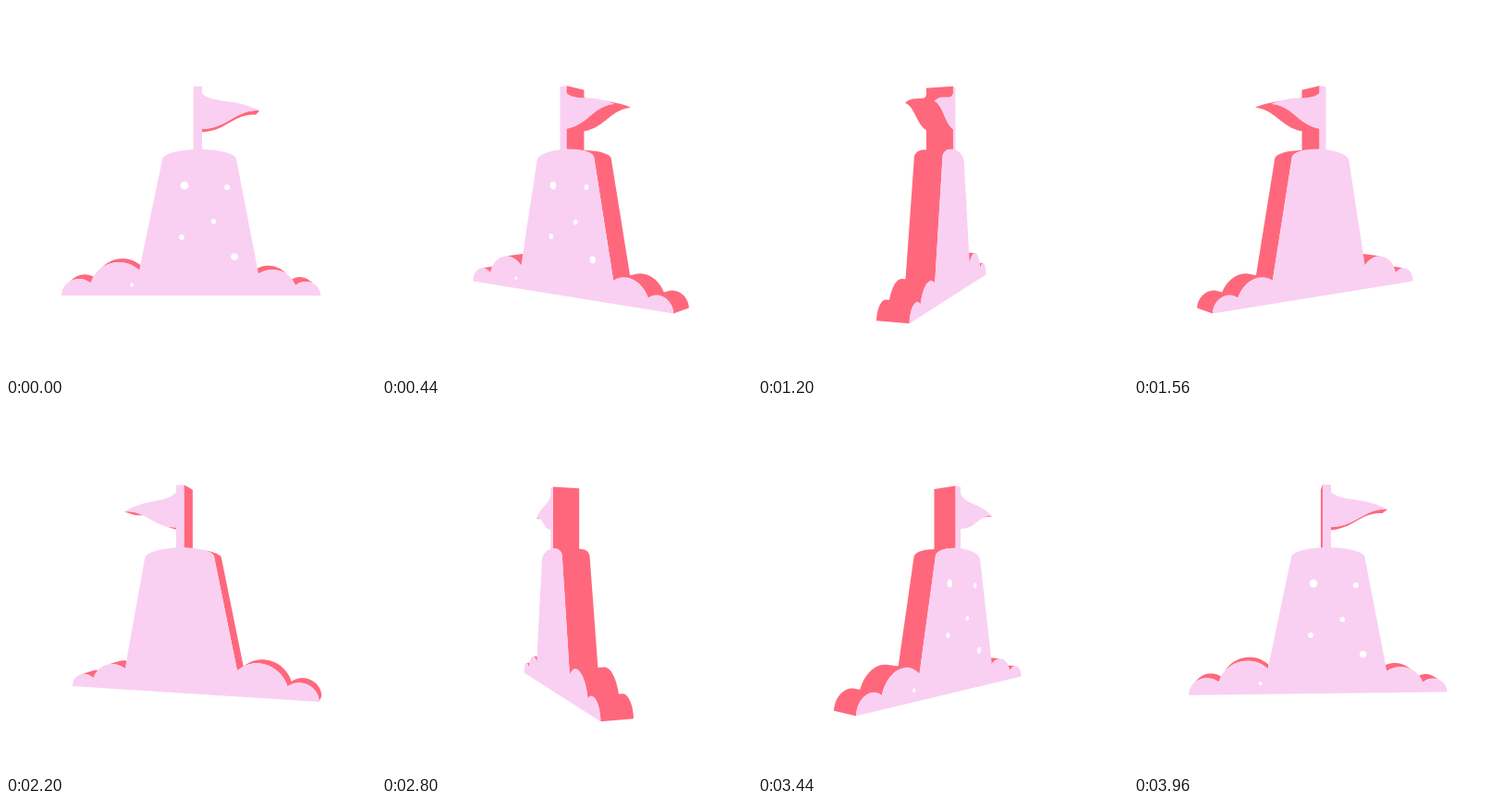
These frames come from a looping animation (400 px wide and 400 px high, 4000 ms). An HTML page with a canvas:

```html
<!DOCTYPE html>
<html lang="en">
<head>
<meta charset="utf-8">
<title>Sandcastle</title>
<style>
  html, body { margin: 0; height: 100%; overflow: hidden; background: #fff; }
  canvas { display: block; }
</style>
</head>
<body>
<canvas id="stage" width="400" height="400"></canvas>
<script>
const ctx = document.getElementById('stage').getContext('2d');
const PINK = '#f9d0f2', RED = '#ff687c', WHITE = '#fff';
const LOOP = 4000, STEP = 40;
const CENTER = 200, CAMERA = 580, HALF_DEPTH = 15;

// Upper half of an ellipse between two x positions
function dome(cx, cy, rx, ry, fromX, toX, steps = 24) {
  const a = Math.acos((fromX - cx) / rx), b = Math.acos((toX - cx) / rx);
  return Array.from({ length: steps + 1 }, (_, i) => {
    const angle = a + (b - a) * i / steps;
    return [cx + rx * Math.cos(angle), cy - ry * Math.sin(angle)];
  });
}

function bezier(p0, p1, p2, p3, steps = 20) {
  return Array.from({ length: steps + 1 }, (_, i) => {
    const t = i / steps, u = 1 - t;
    return [0, 1].map(k =>
      u * u * u * p0[k] + 3 * u * u * t * p1[k] + 3 * u * t * t * p2[k] + t * t * t * p3[k]);
  });
}

// Clockwise silhouette as seen on the front face at angle 0
const outline = [
  ...dome(79, 313, 19, 18, 60, 91.5),
  ...dome(122, 309, 32, 32, 91.5, 144),
  ...dome(209, 166, 40, 11, 169, 203),
  [203, 87], [212, 87],
  ...bezier([212, 95], [225, 106], [245, 99], [274, 113]),
  ...bezier([274, 113], [248, 112], [240, 132], [212, 133]),
  ...dome(209, 166, 40, 11, 212, 249),
  ...dome(288, 312, 27, 27, 273, 313),
  ...dome(324, 313, 16, 15, 313, 340)
];

const dots = [
  [193, 194, 4.4], [239, 196, 3], [224.5, 233, 2.8],
  [190, 250, 3], [247, 271, 3.8], [136, 301.5, 2]
].map(([cx, cy, r]) => Array.from({ length: 20 }, (_, i) => {
  const angle = i * Math.PI / 10;
  return [cx + r * Math.cos(angle), cy + r * Math.sin(angle)];
}));

function projector(angle, z) {
  const cos = Math.cos(angle), sin = Math.sin(angle);
  const unit = (CAMERA - HALF_DEPTH) / CAMERA;
  return ([px, py]) => {
    const x = (px - CENTER) * unit, y = (py - CENTER) * unit;
    const scale = CAMERA / (CAMERA - x * sin - z * cos);
    return [CENTER + (x * cos - z * sin) * scale, CENTER + y * scale];
  };
}

function addPolygon(points) {
  points.forEach(([x, y], i) => i ? ctx.lineTo(x, y) : ctx.moveTo(x, y));
  ctx.closePath();
}

function fillPolygon(points, color) {
  ctx.beginPath();
  addPolygon(points);
  ctx.fillStyle = color;
  ctx.fill();
}

function facesCamera([a, b, c, d]) {
  return (c[0] - a[0]) * (d[1] - b[1]) - (c[1] - a[1]) * (d[0] - b[0]) < 0;
}

function draw(time) {
  const angle = 2 * Math.PI * time / LOOP;
  const toFront = projector(angle, HALF_DEPTH);
  const front = outline.map(toFront);
  const back = outline.map(projector(angle, -HALF_DEPTH));

  ctx.fillStyle = WHITE;
  ctx.fillRect(0, 0, 400, 400);

  ctx.beginPath();
  front.forEach((point, i) => {
    const next = (i + 1) % front.length;
    const wall = [point, front[next], back[next], back[i]];
    if (facesCamera(wall)) addPolygon(wall);
  });
  ctx.fillStyle = RED;
  ctx.fill();

  // The visible cap always lies in front of every wall
  const facing = CAMERA * Math.cos(angle);
  if (facing > HALF_DEPTH) {
    fillPolygon(front, PINK);
    dots.forEach(dot => fillPolygon(dot.map(toFront), WHITE));
  } else if (facing < -HALF_DEPTH) {
    fillPolygon(back, PINK);
  }
}

function tick() {
  const time = performance.now() % LOOP;
  draw(Math.floor(time / STEP) * STEP);
  requestAnimationFrame(tick);
}
tick();
</script>
</body>
</html>
```
